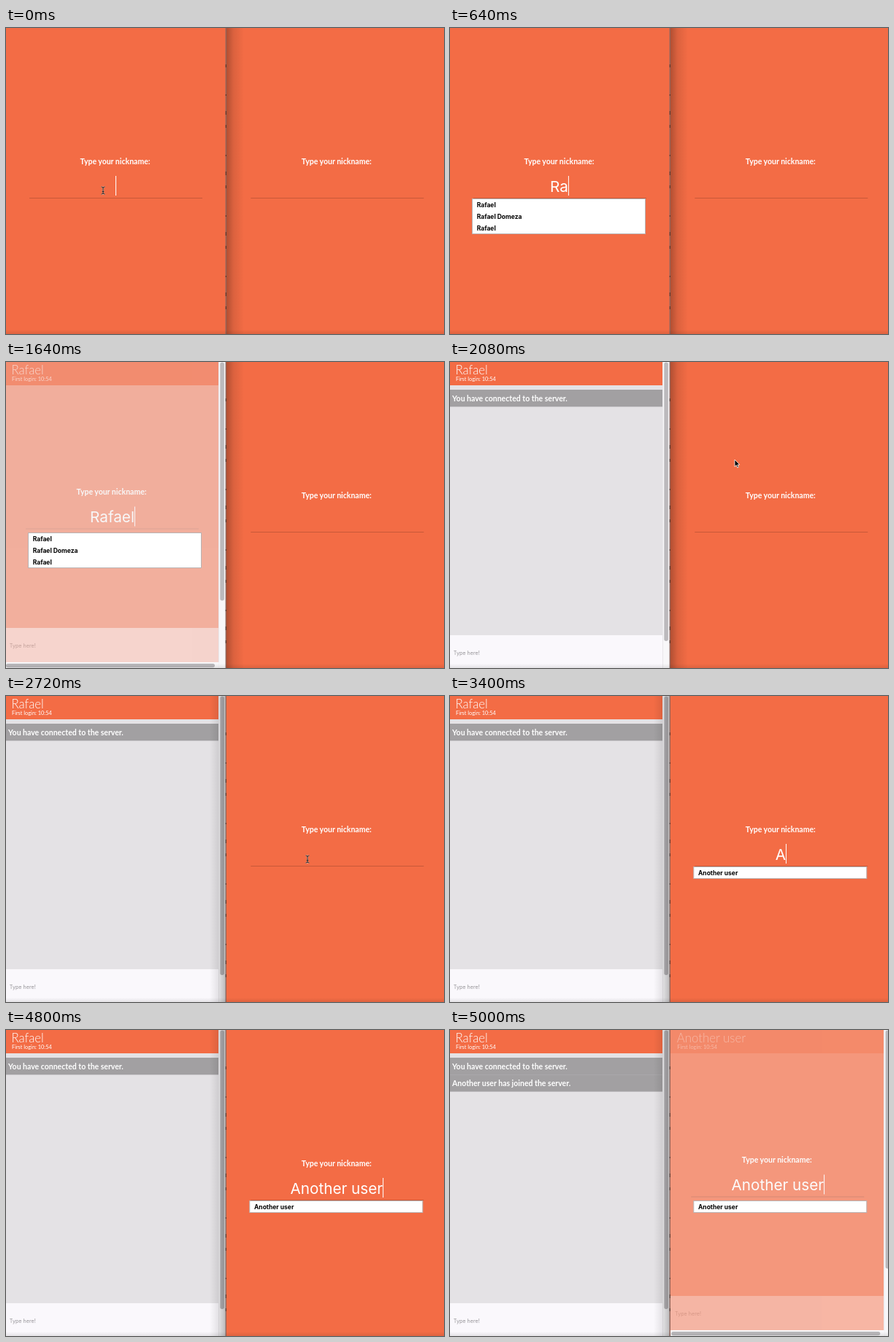
An HTML page that plays this animation: 600 by 420 pixels, repeating every 5040 ms.

```html
<!DOCTYPE html>
<html lang="en">
<head>
<meta charset="utf-8">
<title>Chat login</title>
<style>
  html, body { margin: 0; width: 100%; height: 100%; overflow: hidden; }
  svg { display: block; }
  text { white-space: pre; fill: #fff; font-family: Lato, sans-serif; }
  .label { font-size: 10.5px; font-weight: 700; }
  .name { font-size: 16.8px; font-weight: 300; }
  .login { font-size: 7.4px; }
  .input { font-family: Inter, sans-serif; font-size: 20.7px; }
  .option { font-family: Inter, sans-serif; font-size: 8.5px; font-weight: 700; fill: #000; }
  .hint { font-family: Inter, sans-serif; font-size: 7.2px; fill: #98969a; }
</style>
</head>
<body>
<svg width="600" height="420" viewBox="0 0 600 420">
  <defs>
    <linearGradient id="toRight">
      <stop offset="0" stop-opacity=".27"/>
      <stop offset=".4" stop-opacity=".1"/>
      <stop offset="1" stop-opacity="0"/>
    </linearGradient>
    <linearGradient id="toLeft" x1="1" x2="0">
      <stop offset="0" stop-opacity=".25"/>
      <stop offset=".4" stop-opacity=".1"/>
      <stop offset="1" stop-opacity="0"/>
    </linearGradient>
    <linearGradient id="floor" x2="0" y2="1">
      <stop offset="0" stop-opacity="0"/>
      <stop offset="1" stop-opacity=".09"/>
    </linearGradient>
  </defs>
  <g id="scene"></g>
</svg>
<script>
const LOOP = 5040, FADE = 400, FOCUS_SWITCH = 2640;
const ORANGE = '#f36c45', LEFT = -1.3;
const scene = document.getElementById('scene');
const pen = document.createElement('canvas').getContext('2d');

const users = [
  { x: 0, nick: 'Rafael', options: ['Rafael', 'Rafael Domeza', 'Rafael'], focus: 0, enter: 1440,
    keys: [360, 510, 660, 810, 960, 1110],
    log: [[1840, 'You have connected to the server.'], [4890, 'Another user has joined the server.']] },
  { x: 303.3, nick: 'Another user', options: ['Another user'], focus: 2840, enter: 4850,
    keys: [3280, 3440, 3600, 3760, 3900, 4040, 4140, 4240, 4340, 4440, 4540, 4620],
    log: [] }
];

const mousePath = [[1840, 133, 223], [2080, 390, 134], [2320, 424, 165], [2600, 413, 224]];

const rect = (x, y, w, h, fill, extra = '') =>
  `<rect x="${x}" y="${y}" width="${w}" height="${h}" fill="${fill}" ${extra}/>`;
const text = (cls, x, y, s, anchor = 'start') =>
  `<text class="${cls}" x="${x}" y="${y}" text-anchor="${anchor}">${s}</text>`;
const group = (opacity, body) => `<g opacity="${opacity}">${body}</g>`;

function loginForm(user, t, compact) {
  const w = compact ? 291 : 301, h = compact ? 412 : 420;
  const dx = compact ? -5 : 0, dy = compact ? -4.5 : 0;
  const typed = user.nick.slice(0, user.keys.filter(k => k <= t).length);
  const mid = 149.5 + dx * 0.8;
  pen.font = '20.7px Inter, sans-serif';
  const caretX = typed ? mid + pen.measureText(typed).width / 2 : 150;
  return rect(LEFT, 0, w - LEFT, h, ORANGE) +
    text('label', 149.5 + dx, 186.8 + dy, 'Type your nickname:', 'middle') +
    rect(32 + dx, 233 + dy, 237, 1, '#000', 'opacity=".18"') +
    text('input', mid, 224.5 + dy, typed, 'middle') +
    (t >= user.focus ? rect(caretX, 203 + dy, 1, 27, '#fff') : '');
}

function suggestions(user) {
  const rows = user.options.map((s, i) => text('option', 36.7, 246.2 + 16 * i, s));
  return rect(30.5, 234.5, 237, 16 * rows.length, '#fff', 'stroke="#b9b3b3"') + rows.join('');
}

function scrollbars(compact) {
  const thumb = (x, y, w, h) => rect(x, y, w, h, '#bbb9bc', 'rx="2.7"');
  return rect(291, 0, 10, 420, '#f8f7f9') + rect(291, 0, 1, 420, '#e9e7ea') +
    thumb(293.3, 0.5, 5.6, compact ? 327 : 382.5) +
    (compact ? rect(LEFT, 412, 293, 8, '#f8f7f9') + thumb(0, 414, 286, 5.2) : '');
}

function panel(user, t) {
  const k = Math.min(1, Math.max(0, (t - user.enter) / FADE));
  const shown = 0.5 - Math.cos(Math.PI * k) / 2;
  const compact = t >= user.enter && k < 1;
  const w = (t >= user.enter ? 291 : 301) - LEFT;
  const footY = compact ? 365 : 375, footH = compact ? 47 : 45;
  const log = user.log.filter(([at]) => t >= at).map(([, s], i) =>
    rect(LEFT, 38 + 23.2 * i, w, 23.4, '#a2a0a2') + text('label', 3, 53.8 + 23.2 * i, s)).join('');
  let out = rect(LEFT, 0, 304, 420, '#fff');
  if (shown > 0) out += group(shown, rect(LEFT, 0, w, 420, '#e4e2e5') + log);
  if (shown < 1) out += group(1 - shown, loginForm(user, t, compact));
  if (shown > 0) {
    out += group(shown, rect(LEFT, 0, w, 32, ORANGE) +
      text('name', 7.5, 17, user.nick) + text('login', 8, 25.6, 'First login: 10:54'));
    out += group(shown, rect(LEFT, footY, w, footH, '#faf8fc') + text('hint', 4.7, footY + 26.6, 'Type here!'));
  }
  if (t >= user.enter) out += scrollbars(compact);
  if (t >= user.keys[0] && k < 1) out += suggestions(user);
  return `<g transform="translate(${user.x})">${out}</g>`;
}

function windowEdge(t) {
  const shadow = t < FOCUS_SWITCH
    ? rect(302, 0, 24, 420, 'url(#toRight)')
    : rect(279, 0, 22, 420, 'url(#toLeft)');
  return shadow + rect(300.6, 0, 1.4, 420, '#92655a') +
    '<path d="M301.3 50V420" stroke="#4a3630" stroke-width="1" stroke-dasharray="4 37 2 21 5 14"/>' +
    rect(0, 414, 600, 6, 'url(#floor)');
}

function mouseAt(t) {
  if (t < users[0].keys[0]) return [133, 223, true];
  if (t < mousePath[0][0] || t >= users[1].keys[0]) return null;
  const i = mousePath.findIndex(p => p[0] > t);
  if (i < 0) return [413, 224, true];
  const [t0, x0, y0] = mousePath[i - 1], [t1, x1, y1] = mousePath[i];
  const u = (t - t0) / (t1 - t0), e = u * u * (3 - 2 * u);
  const x = x0 + (x1 - x0) * e, y = y0 + (y1 - y0) * e;
  return [x, y, x > 335 && y > 203];
}

function pointer(t) {
  const mouse = mouseAt(t);
  if (!mouse) return '';
  const [x, y, beam] = mouse;
  const beamPath = 'd="M-2.5-5Q0-5 0-3.5Q0-5 2.5-5M0-4V4M-2.5 5Q0 5 0 3.5Q0 5 2.5 5M-1.3 1.5H1.3" fill="none"';
  const shape = beam
    ? `<path ${beamPath} stroke="#fff" stroke-opacity=".45" stroke-width="2"/><path ${beamPath} stroke="#222"/>`
    : '<path d="M0 0V9.6L2.2 7.6L3.7 11L5.3 10.3L3.8 7H6.8Z" stroke="#fff" stroke-width=".8"/>';
  return `<g transform="translate(${x} ${y})">${shape}</g>`;
}

function draw() {
  const t = performance.now() % LOOP;
  scene.innerHTML = users.map(u => panel(u, t)).join('') + windowEdge(t) + pointer(t);
  requestAnimationFrame(draw);
}
draw();
</script>
</body>
</html>
```
